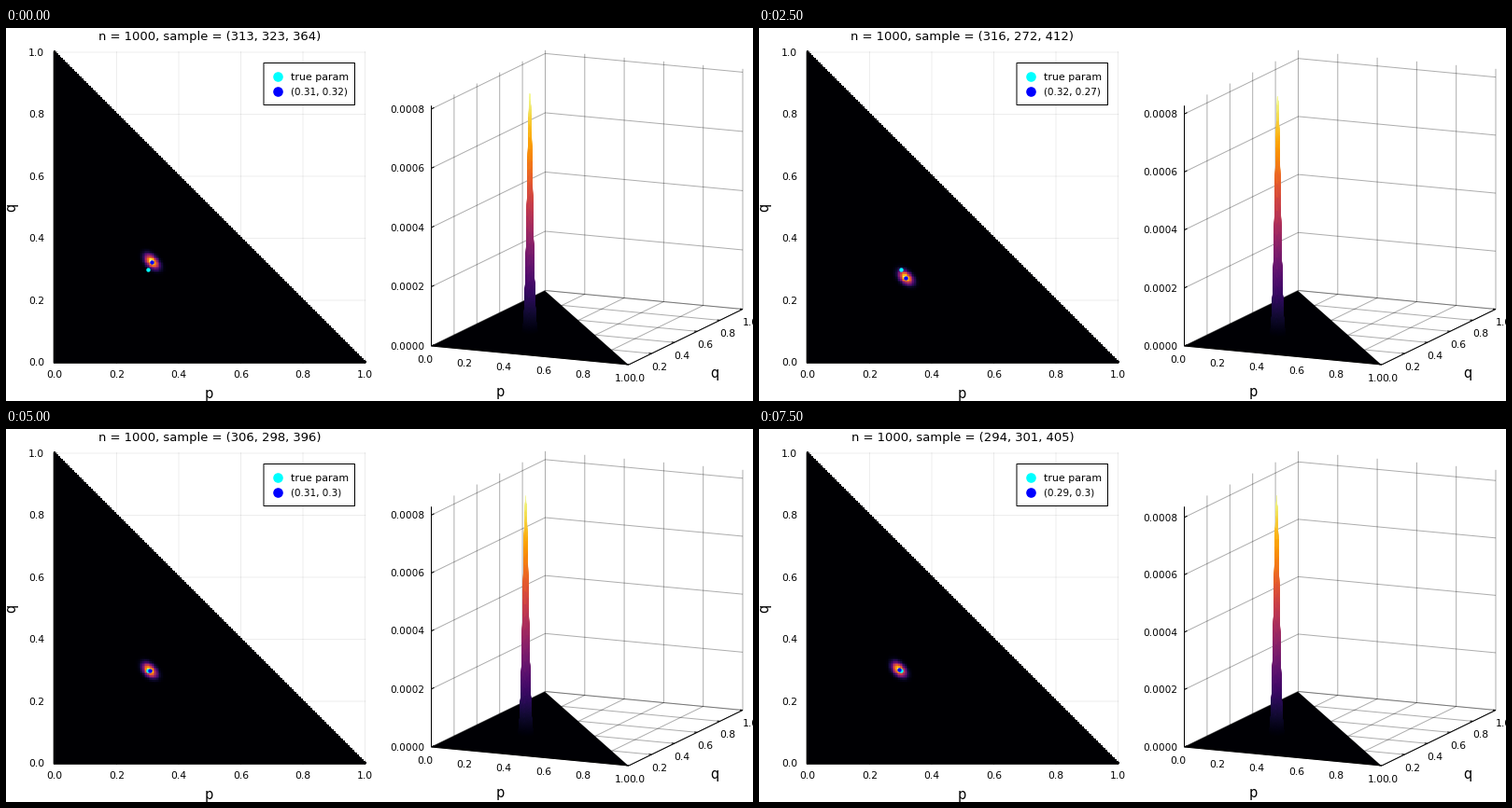
These frames come from a looping animation (800x400 px, 8 s). A matplotlib script:

```python
import math

import matplotlib.pyplot as plt
import numpy as np
from matplotlib.animation import FuncAnimation
from matplotlib.collections import LineCollection, PolyCollection

W, H, DPI = 800, 400, 100
PX = 72 / DPI
TOTAL = 1000
CELLS = 200
STEP = 1 / CELLS
TICKS = np.arange(6) / 5
Z_TICKS = np.arange(5) * 2e-4
TRUE = (0.3, 0.3)

# First two counts of each draw; the third is the remainder.
SAMPLES = [(313, 323), (301, 305), (310, 308), (256, 335),
           (289, 344), (316, 272), (295, 295), (301, 290),
           (289, 306), (304, 313), (306, 298), (288, 315),
           (312, 300), (301, 296), (309, 312), (294, 301)]

plt.rcParams["font.family"] = "DejaVu Sans"
plt.rcParams["path.snap"] = False
cmap = plt.get_cmap("inferno")

axis = np.arange(CELLS + 1) * STEP
P, Q = np.meshgrid(axis, axis)
I, J = np.meshgrid(np.arange(CELLS + 1), np.arange(CELLS + 1))
OUTSIDE = I + J > CELLS


def likelihood(a, b):
    """Multinomial probability of the counts for each (p, q) on the grid."""
    c = TOTAL - a - b
    norm = math.lgamma(TOTAL + 1) - sum(math.lgamma(k + 1) for k in (a, b, c))
    logs = [k * np.log(np.clip(v, 1e-12, None))
            for k, v in ((a, P), (b, Q), (c, 1 - P - Q))]
    return np.where(OUTSIDE, np.nan, np.exp(norm + sum(logs)))


def flat(p, q):
    return 52 + 332.5 * p, 358.5 - 332.5 * q


def solid(p, q, h=0.0):
    """Project a point of the 3D box; h is the height as a share of the box."""
    return (455.5 + 211.5 * p + 122 * q,
            341 + 20 * p - 59.5 * q - 257.7 * h)


fig = plt.figure(figsize=(W / DPI, H / DPI), dpi=DPI, facecolor="white")
ax = fig.add_axes([0, 0, 1, 1])
ax.axis("off")


def line(a, b, color="black", alpha=1.0, z=1):
    ax.plot(*zip(a, b), color=color, alpha=alpha, lw=PX, zorder=z,
            solid_capstyle="butt")


def label(x, y, s, size=10.7, ha="center", **kw):
    return ax.text(x, y + 0.36 * size, s, fontsize=size * PX, ha=ha,
                   va="baseline", zorder=9, **kw)


def dot(x, y, r, color, z):
    return ax.plot([x], [y], "o", ms=2 * r * PX, mew=0, color=color,
                   zorder=z)[0]


# Flat panel
left, low = flat(-STEP / 2, -STEP / 2)
right, high = flat(1 + STEP / 2, 1 + STEP / 2)
for t in TICKS:
    x, y = flat(t, t)
    line((x, high), (x, low), alpha=0.07)
    line((left, y), (right, y), alpha=0.07)
    line((x, low), (x, low - 3.5), z=4)
    line((left, y), (left + 3.5, y), z=4)
    label(x, 371, f"{t:.1f}")
    label(41, y, f"{t:.1f}", ha="right")
line((left, high), (left, low), z=4)
line((left, low), (right, low), z=4)
label(217.5, 392, "p", 14.5)
ax.text(5.5, 192, "q", fontsize=14.5 * PX, rotation=90, ha="center",
        va="center")
title = label(218, 7.8, "", 13.1)

heat = ax.imshow(np.zeros_like(P), cmap=cmap, origin="lower", aspect="auto",
                 interpolation="nearest", extent=(left, right, low, high),
                 zorder=3)
dot(*flat(*TRUE), 2.2, "cyan", 5)
guess = dot(0, 0, 2.2, "blue", 6)

ax.add_patch(plt.Rectangle((276, 37.5), 97.5, 45, fc="white", ec="black",
                           lw=PX, zorder=7))
dot(290.8, 52.3, 5.3, "cyan", 8)
dot(290.8, 67.5, 5.3, "blue", 8)
label(305, 52.2, "true param", 11, ha="left")
guess_text = label(305, 67.4, "", 10.4, ha="left")

# Solid panel
GRID = dict(alpha=0.32, z=1)
for t in TICKS:
    line(solid(t, 0), solid(t, 1), **GRID)
    line(solid(0, t), solid(1, t), **GRID)
    line(solid(0, t), solid(0, t, 1), **GRID)
    if t > 0:
        line(solid(t, 1), solid(t, 1, 1), **GRID)
    x, y = solid(t, 0)
    label(x - 7, y + 14, f"{t:.1f}")
    x, y = solid(1, t)
    label(x + 8.5, y + 14, f"{t:.1f}")
    line((x, y), (x - 3, y - 0.3), z=4)
line(solid(0, 0), solid(0, 0, 1), z=4)
line(solid(0, 0), solid(1, 0), z=4)
line(solid(1, 0), solid(1, 1), z=4)
label(529.5, 390, "p", 14.5)
label(758.5, 370, "q", 14.5)
ax.add_patch(plt.Polygon([solid(0, 0), solid(0.997, 0), solid(0, 0.997)],
                         fc=cmap(0.0), ec="none", zorder=2))

levels = LineCollection([], colors="black", alpha=0.32, linewidths=PX,
                        zorder=1)
z_marks = LineCollection([], colors="black", linewidths=PX, zorder=4)
spike = PolyCollection([], zorder=3, linewidths=0.2 * PX)
for c in (levels, z_marks, spike):
    ax.add_collection(c, autolim=False)
z_labels = [label(448, 0, f"{z:.4f}", 10.5, ha="right") for z in Z_TICKS]

ax.set_xlim(0, W)
ax.set_ylim(H, 0)


def surface(share, a, b, reach=12, fine=4):
    """Small faces around the peak, farthest first, with mean heights."""
    ci, cj = round(a / TOTAL * CELLS), round(b / TOTAL * CELLS)
    near = np.arange(-reach, reach + 1)
    dense = np.linspace(-reach, reach, 2 * reach * fine + 1)
    rough = share[np.ix_(cj + near, ci + near)]
    rows = np.array([np.interp(dense, near, r) for r in rows_of(rough)])
    hs = np.array([np.interp(dense, near, r) for r in rows_of(rows.T)]).T[::-1]
    p, q = np.meshgrid((ci + dense) * STEP, (cj + dense[::-1]) * STEP)
    pts = np.stack(solid(p, q, hs), axis=-1)

    def corners(m):
        return [m[:-1, :-1], m[:-1, 1:], m[1:, 1:], m[1:, :-1]]

    faces = np.stack(corners(pts), axis=2).reshape(-1, 4, 2)
    return faces, np.mean(corners(hs), axis=0).ravel()


def rows_of(m):
    return (m[k] for k in range(len(m)))


def draw(k):
    a, b = SAMPLES[k]
    p, q = a / TOTAL, b / TOTAL
    z = likelihood(a, b)
    top = np.nanmax(z)

    title.set_text(f"n = {TOTAL}, sample = ({a}, {b}, {TOTAL - a - b})")
    guess_text.set_text(f"({round(p, 2)}, {round(q, 2)})")
    x, y = flat(p, q)
    guess.set_data([x], [y])
    heat.set_data(z)
    heat.set_clim(0, top)

    faces, means = surface(z / top, a, b)
    colors = cmap(means)
    spike.set_verts(faces)
    spike.set_facecolor(colors)
    spike.set_edgecolor(colors)

    rows, marks = [], []
    for value, text in zip(Z_TICKS, z_labels):
        h = value / top
        rows.append([solid(0, 0, h), solid(0, 1, h), solid(1, 1, h)])
        x, y = solid(0, 0, h)
        marks.append([(x, y), (x + 3, y - 1.5)])
        text.set_y(y + 0.36 * 10.5)
    levels.set_segments(rows)
    z_marks.set_segments(marks)
    return []


anim = FuncAnimation(fig, draw, frames=len(SAMPLES), interval=500,
                     repeat=True, repeat_delay=0, blit=False)
plt.show()
```
